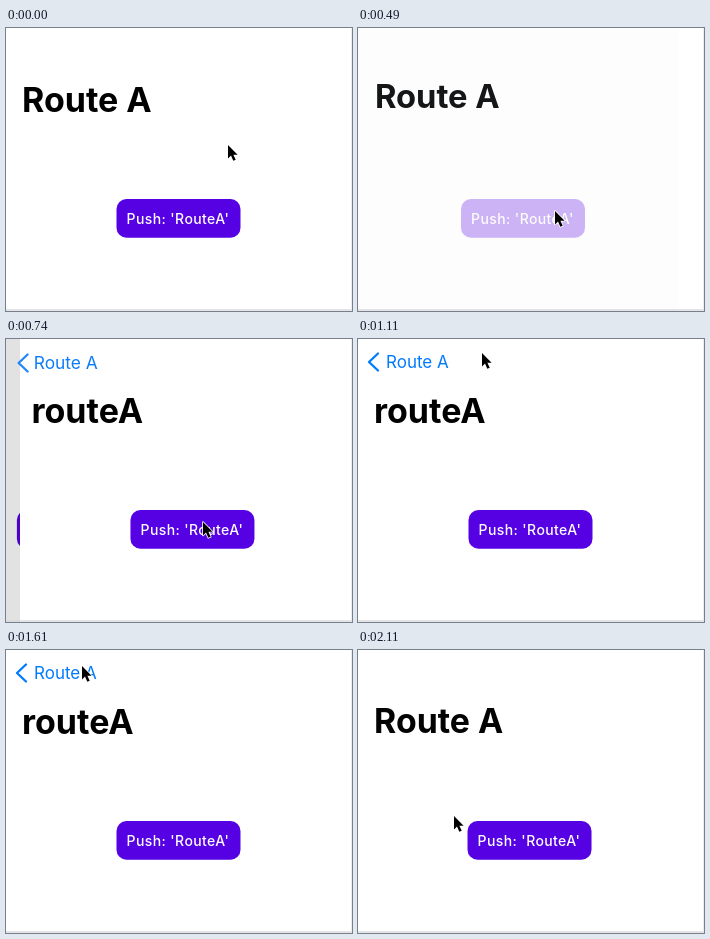
An HTML page that plays this animation: 346x283 px, repeating every 2230 ms.

```html
<!DOCTYPE html>
<html lang="en">
<head>
<meta charset="utf-8">
<title>Push and pop navigation</title>
<style>
  html, body { margin: 0; width: 100%; height: 100%; overflow: hidden; background: #fff; }
  svg { display: block; overflow: hidden; }
  text { font-family: Inter, Roboto, sans-serif; }
  .large { font-size: 34px; font-weight: 700; }
  .push { font-size: 14px; font-weight: 500; letter-spacing: .4px; fill: #fff; }
</style>
</head>
<body>
<svg id="stage" width="346" height="283" viewBox="0 0 346 283">
  <defs>
    <g id="button">
      <rect x="110.5" y="171" width="124" height="38.7" rx="10" fill="#5600e4"/>
      <text class="push" x="120.6" y="196">Push: 'RouteA'</text>
    </g>
  </defs>
  <rect width="346" height="283" fill="#fff"/>
  <g id="root"><use id="rootButton" href="#button"/></g>
  <rect id="dim" width="346" height="283"/>
  <svg id="page" width="346" height="283">
    <rect width="346" height="283" fill="#fff"/>
    <text id="pageTitle" class="large" y="83.5">routeA</text>
    <use href="#button"/>
  </svg>
  <path id="chevron" d="M20 14.5 L11 23 L20 31.5" fill="none" stroke-width="2.3"
        stroke-linecap="round" stroke-linejoin="round"/>
  <text id="label">Route A</text>
  <rect y="281.3" width="346" height="1.4" fill="#d9d9dc"/>
  <rect x="345" width="1" height="282" fill="#ededef"/>
  <path id="cursor" d="M0 0 V13.4 L3 10.6 L5.3 15.8 L7.7 14.8 L5.4 9.8 H9.6 Z"
        fill="#000" stroke="#fff" stroke-width="1.6" stroke-linejoin="round" paint-order="stroke"/>
</svg>
<script>
const LOOP = 2230, WIDTH = 346, PARALLAX = 0.3;
const PUSH_AT = 466, POP_AT = 1748;
const OMEGA = Math.sqrt(1000 / 3) / 1000;

const CURSOR_START = { x: 222, y: 117 };
const CURSOR_MOVES = [
  { x: 197, y: 183, from: 0, to: 240 },
  { x: 124, y: 14, from: 865, to: 1115 },
  { x: 76, y: 16, from: 1115, to: 1490 },
  { x: 96, y: 166, from: 1865, to: 2115 }
];

const el = id => document.getElementById(id);
const set = (id, attrs) => {
  for (const key in attrs) el(id).setAttribute(key, attrs[key]);
};
const mix = (a, b, k) => a + (b - a) * k;
const ramp = (v, from, to) => Math.min(1, Math.max(0, (v - from) / (to - from)));
const glide = (t, from, to) => {
  const k = ramp(t, from, to);
  return k * k * (3 - 2 * k);
};

// Eight poses a second after a short lead-in, switching on whole 10 ms
function held(t) {
  if (t < 240) return t < 30 ? 0 : 30;
  const tick = Math.floor(t / 10) * 10;
  return 240 + 125 * Math.floor((tick + 5 - 240) / 125);
}

// Critically damped spring from 0 to 1
function spring(ms) {
  const w = OMEGA * Math.max(0, ms);
  const x = 1 - (1 + w) * Math.exp(-w);
  return x > .998 ? 1 : x;
}

function cursorAt(t) {
  return CURSOR_MOVES.reduce((at, move) => {
    const k = glide(t, move.from, move.to);
    return { x: mix(at.x, move.x, k), y: mix(at.y, move.y, k) };
  }, CURSOR_START);
}

// Black to link blue, greyed on the way
function tint(p) {
  const grey = p * (1 - p);
  const [r, g, b] = [320 * grey, 122 * p + 200 * grey, 255 * p + 80 * grey];
  return `rgb(${[r, g, b].map(Math.round)})`;
}

function draw(t) {
  const p = t < POP_AT ? spring(t - PUSH_AT) : 1 - spring(t - POP_AT);
  const offset = (1 - p) * WIDTH;
  const morph = p + .5 * p * p * (1 - p);
  const titleShift = Math.max(0, .93 * offset - 3.5);
  const pressed = glide(t, 240, 365) - glide(t, 490, 740);
  const color = tint(p);
  const cursor = cursorAt(t);

  set('root', { transform: `translate(${-PARALLAX * WIDTH * p} 0)` });
  set('rootButton', { opacity: 1 - .71 * pressed });
  set('dim', { opacity: .12 * p });
  set('page', { x: offset });
  set('pageTitle', { x: 16 + titleShift - offset, opacity: ramp(p, .1, .8) });
  set('chevron', {
    stroke: color,
    opacity: ramp(p, .5, 1),
    transform: `translate(${40 * (1 - p)} ${25 * (1 - p)})`
  });
  set('label', {
    x: mix(16, 28, morph),
    y: mix(83.7, 29.2, morph),
    'font-size': mix(34, 17, morph),
    'font-weight': Math.round(mix(700, 420, morph)),
    fill: color
  });
  set('cursor', { transform: `translate(${cursor.x} ${cursor.y})` });
}

const start = performance.now();
function frame() {
  draw(held((performance.now() - start) % LOOP));
  requestAnimationFrame(frame);
}
draw(0);
requestAnimationFrame(frame);
</script>
</body>
</html>
```
